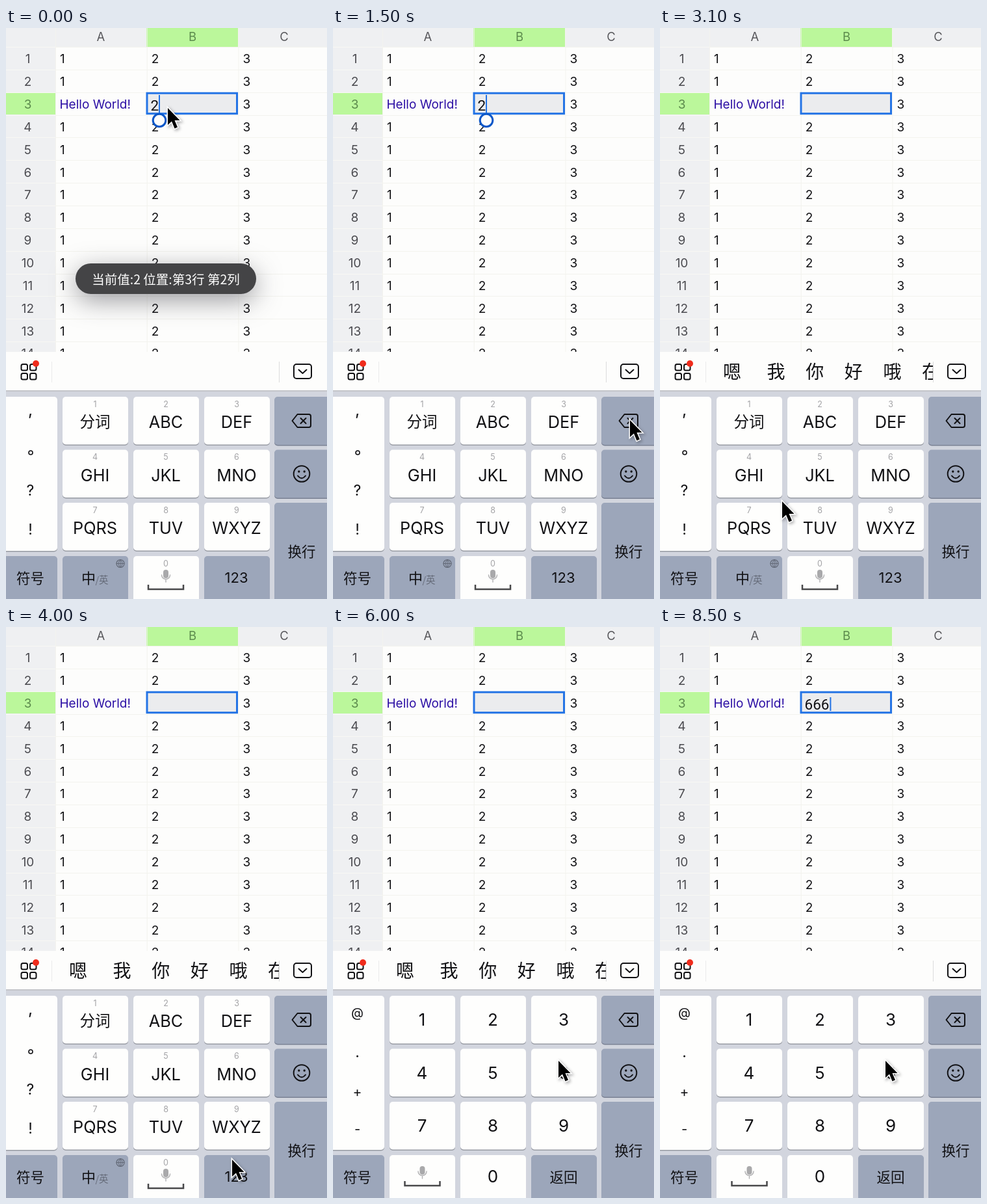
An HTML page with a canvas for the animation above (8600 ms loop, 494 px wide and 878 px high).

```html
<!DOCTYPE html>
<html lang="zh-CN">
<head>
<meta charset="utf-8">
<title>Spreadsheet cell editing</title>
<style>
html, body { margin: 0; width: 100%; height: 100%; overflow: hidden; background: #fdfdfc; }
canvas { display: block; width: 494px; height: 878px; }
</style>
</head>
<body>
<canvas></canvas>
<script>
const W = 494, H = 878, LOOP = 8600;
const canvas = document.querySelector('canvas');
const ratio = window.devicePixelRatio || 1;
canvas.width = W * ratio;
canvas.height = H * ratio;
const ctx = canvas.getContext('2d');

const SANS = 'Inter, "Noto Sans CJK SC", "Noto Sans CJK", sans-serif';
const CJK = '"Noto Sans CJK SC", "Noto Sans CJK", sans-serif';
const EDIT = 'Roboto, sans-serif';
const INK = '#111114', PAPER = '#fdfdfc', HEAD = '#eff0f2', GREEN = '#bbf79b';
const GRID = '#f3f3ee', BLUE = '#2474e5', KEY = '#fefefd', DARK_KEY = '#9ca6ba', TRAY = '#d2d5de';

// Time, in ms, of each step of the story
const TOAST_OUT = 1050, ERASE = 2200, NUMPAD = 4500, TYPED = [6400, 6900, 7400];
const POINTER_PATH = [
  [0, 248, 122], [100, 248, 122], [900, 473, 609], [1400, 456, 602], [2300, 456, 602],
  [3100, 187, 727], [3900, 347, 818], [4600, 347, 818], [5300, 346, 666], [LOOP, 346, 666]
];
const KEY_X = [87, 196, 305], KEY_Y = [567, 648.5, 730, 812], KEY_W = 101, KEY_H = 74;
const LETTERS = ['分词', 'ABC', 'DEF', 'GHI', 'JKL', 'MNO', 'PQRS', 'TUV', 'WXYZ'];

const clamp = v => Math.max(0, Math.min(1, v));
const ease = v => v * v * (3 - 2 * v);

function rect(x, y, w, h, color) {
  ctx.fillStyle = color;
  ctx.fillRect(x, y, w, h);
}

function round(x, y, w, h, r, color) {
  ctx.beginPath();
  ctx.roundRect(x, y, w, h, r);
  ctx.fillStyle = color;
  ctx.fill();
}

// Text centred vertically on y by its capital height
function label(str, x, y, size, color = INK, align = 'center', font = SANS) {
  const isCjk = /[\u4e00-\u9fff]/.test(str);
  ctx.font = `${size}px ${isCjk ? CJK : font}`;
  ctx.fillStyle = color;
  ctx.textAlign = align;
  ctx.textBaseline = 'alphabetic';
  ctx.fillText(str, x, y + size * 0.36);
}

function stroke(path, color = INK, width = 2) {
  ctx.strokeStyle = color;
  ctx.lineWidth = width;
  ctx.lineCap = ctx.lineJoin = 'round';
  ctx.stroke(new Path2D(path));
}

function disc(x, y, r, fill, line, width) {
  ctx.beginPath();
  ctx.arc(x, y, r, 0, 7);
  if (fill) { ctx.fillStyle = fill; ctx.fill(); }
  if (line) { ctx.strokeStyle = line; ctx.lineWidth = width; ctx.stroke(); }
}

function drawSheet(t) {
  const rowH = 34.85, colW = 140.7, left = 76, top = 30;
  rect(0, 0, W, 498, PAPER);
  rect(0, 0, W, top, HEAD);
  rect(0, 0, left, 498, HEAD);
  rect(216, 0, 141, top, GREEN);
  rect(0, 99, left, 34, GREEN);
  for (let c = 0; c < 3; c++) {
    rect(left + c * colW, 0, 1, 498, GRID);
    label('ABC'[c], 146 + c * 141, 13, 18.5, c === 1 ? '#5b8a4c' : '#58585c');
  }
  for (let r = 0; r < 14; r++) {
    const y = 47.5 + r * rowH;
    rect(0, Math.round(top + r * rowH) - 1, left, 1, '#f8f8f4');
    rect(left, Math.round(top + r * rowH) - 1, W - left, 1, GRID);
    label(String(r + 1), 33.5, y, 19, r === 2 ? '#5b8a4c' : '#4b4b50');
    for (let c = 0; c < 3; c++) {
      if (r === 2 && c < 2) continue;
      label(String(c + 1), 83 + c * 140.7, y, 19, INK, 'left');
    }
  }
  label('Hello World!', 82.5, 117.5, 19, '#2a0da4', 'left');
  drawEditor(t);
}

function drawEditor(t) {
  const count = TYPED.filter(at => t >= at).length;
  const value = t < ERASE ? '2' : '6'.repeat(count);
  rect(216, 99, 141, 34, '#ebecee');
  ctx.strokeStyle = BLUE;
  ctx.lineWidth = 3;
  ctx.strokeRect(217, 100.2, 138.5, 31.5);
  label(value, 222.5, 118.5, 22.5, INK, 'left', EDIT);
  if (t < ERASE) {
    const hidden = t % 1000 > 50 && t % 1000 < 500;
    if (!hidden) rect(235, 103, 2, 29, BLUE);
    disc(236, 142, 9.8, PAPER, '#0b57c8', 3);
    return;
  }
  const lastEdit = count ? TYPED[count - 1] : ERASE;
  if ((t - lastEdit) % 1000 < 500) rect(223 + count * 12.8, 108, 2, 21, BLUE);
}

function drawToast(t) {
  const alpha = 1 - clamp((t - TOAST_OUT) / 300);
  if (!alpha) return;
  ctx.save();
  ctx.globalAlpha = alpha;
  ctx.shadowColor = 'rgba(60, 60, 70, 0.5)';
  ctx.shadowBlur = 38 * ratio;
  ctx.shadowOffsetY = 10 * ratio;
  round(107, 362, 278, 47, 23.5, '#444446');
  ctx.shadowColor = 'transparent';
  label('当前值:2 位置:第3行 第2列', 246, 387, 19.5, '#fefefe');
  ctx.restore();
}

function drawToolbar(t) {
  rect(0, 498, W, 60, PAPER);
  for (const x of [23.5, 37]) for (const y of [517, 531]) {
    ctx.beginPath();
    ctx.roundRect(x, y, 9.5, 9.5, 2.5);
    ctx.strokeStyle = INK;
    ctx.lineWidth = 2;
    ctx.stroke();
  }
  disc(46, 516, 5, '#f02c1c');
  if (t >= ERASE && t < TYPED[0]) {
    ctx.save();
    ctx.beginPath();
    ctx.rect(71, 498, 350, 60);
    ctx.clip();
    [...'嗯我你好哦在'].forEach((ch, i) => label(ch, i ? 119 + i * 59.6 : 111, 529, 28));
    ctx.restore();
  }
  rect(70, 513, 1, 32, '#ebebeb');
  rect(420, 513, 1, 32, '#dcdcdc');
  ctx.beginPath();
  ctx.roundRect(443, 517, 27, 22, 4);
  ctx.strokeStyle = INK;
  ctx.lineWidth = 2;
  ctx.stroke();
  stroke('M450.5 525.5 L456.5 531 L462.5 525.5');
}

function key(x, y, w, h, color = KEY, radii = 5) {
  round(x, y + 1.5, w, h, radii, color === KEY ? '#989ba3' : '#7a8294');
  round(x, y, w, h, radii, color);
}

function drawSpace(x, y) {
  round(x - 4, y - 10, 8, 13, 4, '#a9a9ab');
  stroke(`M${x - 6.5} ${y - 2} A6.5 6.5 0 0 0 ${x + 6.5} ${y - 2} M${x} ${y + 5} V${y + 9}`, '#b4b4b6', 1.5);
  ctx.strokeStyle = '#48484a';
  ctx.lineWidth = 2.5;
  ctx.lineCap = 'butt';
  ctx.lineJoin = 'miter';
  ctx.stroke(new Path2D(`M${x - 27} ${y + 13} V${y + 20} H${x + 27} V${y + 13}`));
}

function drawKeyboard(t) {
  const numeric = t >= NUMPAD;
  rect(0, 558, W, 320, TRAY);
  rect(0, 557, W, 2, '#c4c5ca');

  key(-6, 567, 85, 237);
  key(-6, 812, 85, 80, DARK_KEY);
  key(413, 567, 90, 74, DARK_KEY);
  key(413, 648.5, 90, 74, DARK_KEY);
  key(413, 730, 90, 160, DARK_KEY);
  label('符号', 37.5, 846, 21.5);
  label('换行', 455, 805, 21.5);

  stroke('M440.5 604 L448.5 594 H466 Q469 594 469 597 V611 Q469 614 466 614 H448.5 Z');
  stroke('M453.5 600 L461.5 608 M461.5 600 L453.5 608');
  disc(455, 685.5, 12.3, null, INK, 2);
  disc(450.8, 682, 1.7, INK);
  disc(459.2, 682, 1.7, INK);
  stroke('M449 688.5 Q455 696 461 688.5');

  for (let i = 0; i < 9; i++) {
    const x = KEY_X[i % 3], row = Math.floor(i / 3), y = KEY_Y[row], cx = x + 50;
    key(x, y, KEY_W, KEY_H - 0.5);
    if (numeric) {
      label(String(i + 1), cx, y + 37, 26);
    } else {
      label(String(i + 1), cx, y + 11, 12.5, '#a3a3a6');
      label(LETTERS[i], cx, y + 39, i ? 25.3 : 23.5);
    }
  }
  KEY_X.forEach((x, i) => {
    const dark = i === 2 || (i === 0 && !numeric);
    key(x, KEY_Y[3], KEY_W, 80, dark ? DARK_KEY : KEY);
  });

  if (numeric) {
    label('@', 37.5, 593, 19.5);
    disc(37.5, 660, 1.5, INK);
    label('+', 37.5, 714, 21);
    label('-', 37.5, 772, 20);
    drawSpace(137.5, 839);
    label('0', 246, 845, 26);
    label('返回', 355, 846, 21.5);
  } else {
    label(',', 37.5, 587, 25);
    disc(38, 653, 3, null, INK, 1.6);
    label('?', 37.5, 711, 23);
    label('!', 37.5, 771, 23);
    label('中', 127, 846, 22);
    label('/英', 147.5, 849, 14.5, '#666c7a');
    disc(176, 823.5, 6, null, '#626876', 1.2);
    stroke('M170 823.5 H182 M176 817.5 V829.5 M176 817.5 Q169.5 823.5 176 829.5 Q182.5 823.5 176 817.5', '#626876', 1);
    label('0', 246, 823, 12.5, '#a3a3a6');
    drawSpace(246, 843);
    label('123', 354.5, 845, 22);
  }
}

function drawPointer(t) {
  const next = POINTER_PATH.findIndex(p => p[0] > t);
  const [t0, x0, y0] = POINTER_PATH[next - 1];
  const [t1, x1, y1] = POINTER_PATH[next];
  const k = ease(clamp((t - t0) / (t1 - t0)));
  ctx.save();
  ctx.translate(x0 + (x1 - x0) * k, y0 + (y1 - y0) * k);
  const arrow = new Path2D('M1 1 V27 L7 21.5 L11.5 32.5 L16 30.5 L11.5 20 H19.5 Z');
  ctx.shadowColor = 'rgba(40, 40, 45, 0.4)';
  ctx.shadowBlur = 4 * ratio;
  ctx.shadowOffsetX = ctx.shadowOffsetY = 2 * ratio;
  ctx.strokeStyle = '#fefefe';
  ctx.lineWidth = 3;
  ctx.lineJoin = 'miter';
  ctx.stroke(arrow);
  ctx.shadowColor = 'transparent';
  ctx.fillStyle = '#000';
  ctx.fill(arrow);
  ctx.restore();
}

function frame() {
  const t = performance.now() % LOOP;
  ctx.setTransform(ratio, 0, 0, ratio, 0, 0);
  drawSheet(t);
  drawToast(t);
  drawToolbar(t);
  drawKeyboard(t);
  drawPointer(t);
  requestAnimationFrame(frame);
}
frame();
</script>
</body>
</html>
```
